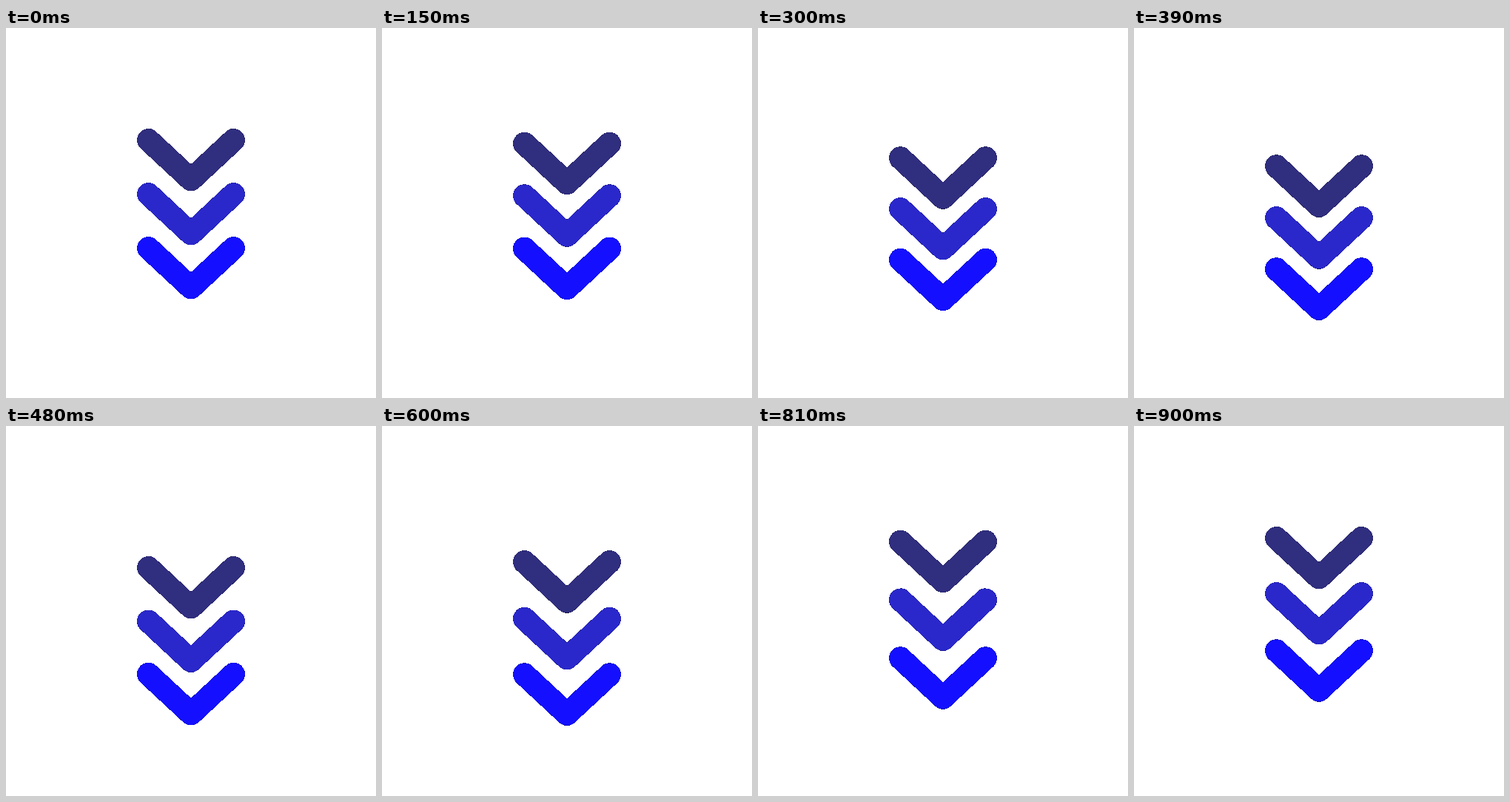
Write an HTML page that moves like this. It is 500x500 px and loops after 0.93 s.

```html
<!DOCTYPE html>
<html lang="en">
<head>
<meta charset="utf-8">
<title>Scroll down chevrons</title>
<style>
  html, body { margin: 0; width: 100%; height: 100%; overflow: hidden; background: #fff; }
  svg { display: block; width: 100vw; height: 100vh; }
  path { fill: none; stroke-width: 31; stroke-linecap: round; stroke-linejoin: round; }
</style>
</head>
<body>
<svg viewBox="0 0 500 500">
  <!-- Hard silhouette whose edge pixels blend into black. -->
  <filter id="hardEdge" filterUnits="userSpaceOnUse" x="0" y="0" width="500" height="500" color-interpolation-filters="sRGB">
    <feColorMatrix values="0 0 0 0 0  0 0 0 0 0  0 0 0 0 0  0 0 0 1 0"/>
    <feComponentTransfer result="silhouette"><feFuncA type="discrete" tableValues="0 1"/></feComponentTransfer>
    <feComposite in="SourceGraphic" in2="silhouette" operator="atop"/>
  </filter>
  <g filter="url(#hardEdge)">
    <path stroke="#302e7f" d="M192.5 151.5 250 205 307.5 151.5"/>
    <path stroke="#2a28cb" d="M192.5 224.5 250 278 307.5 224.5"/>
    <path stroke="#1410ff" d="M192.5 297.5 250 351 307.5 297.5"/>
  </g>
</svg>
<script>
  const STEP = 30, STEPS = 31, DROP = 40, FALL = 14;
  const chevrons = document.querySelectorAll('path');

  // Smooth ease from 0 to 1 between two steps.
  function ease(step, start, end) {
    const x = Math.min(1, Math.max(0, (step - start) / (end - start)));
    return x * x * (3 - 2 * x);
  }

  function draw(now) {
    const step = Math.floor(now / STEP) % STEPS;
    chevrons.forEach((chevron, i) => {
      // Each chevron starts one step later and returns one step slower.
      const start = 2 + i, low = start + FALL, end = low + FALL + i;
      const y = DROP * (ease(step, start, low) - ease(step, low, end));
      chevron.setAttribute('transform', `translate(0 ${y.toFixed(2)})`);
    });
    requestAnimationFrame(() => draw(performance.now() - origin));
  }

  const origin = performance.now();
  draw(0);
</script>
</body>
</html>
```
